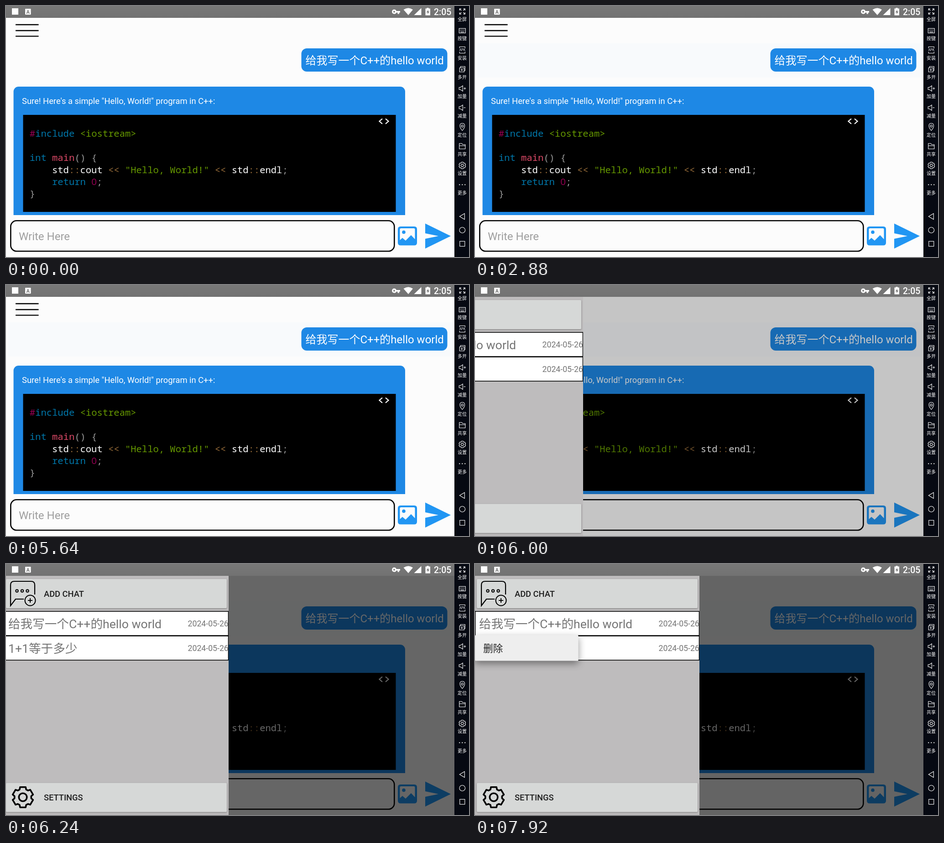
Write an HTML page that moves like this. It is 1015 px wide and 551 px high and loops after 8000 ms.

```html
<!DOCTYPE html>
<html lang="zh-CN">
<head>
<meta charset="utf-8">
<title>Chat app demo</title>
<style>
html, body { margin: 0; width: 100%; height: 100%; overflow: hidden; background: #fcfcfc; }
svg { display: block; width: 1015px; height: 551px; }
text { font-family: Roboto, "Noto Sans CJK SC", "Noto Sans CJK", sans-serif; white-space: pre; }
.line { fill: none; stroke: #000; }
.code text { font: 20.5px "Noto Sans Mono", "DejaVu Sans Mono", monospace; fill: #fff; }
.code .kw { fill: #07a; }
.code .num { fill: #905; }
.code .str { fill: #690; }
.code .fn { fill: #dd4a68; }
.code .op { fill: #9a6e3a; }
.code .pt { fill: #999; }
.code .zero { font-family: "Open Sans", sans-serif; }
.btn { fill: #d6d8d7; filter: drop-shadow(0 1.5px 1.5px rgba(0,0,0,.38)); }
.caps { font-size: 18.3px; font-weight: 500; fill: #1f1f1f; }
.item { font-size: 26.6px; fill: #757575; }
.date { font-size: 17.7px; fill: #757575; }
.pop { filter: drop-shadow(0 6px 8px rgba(0,0,0,.42)); }
.side text { font: 10px "Noto Sans CJK SC", "Noto Sans CJK", sans-serif; fill: #fff; text-anchor: middle; }
.side g { fill: none; stroke: #fff; stroke-width: 1.1; }
</style>
</head>
<body>
<svg viewBox="0 0 1015 551">
  <defs>
    <clipPath id="listClip"><rect y="82" width="983" height="377"/></clipPath>
    <clipPath id="appClip"><rect width="983" height="551"/></clipPath>
    <clipPath id="panelClip"><rect y="26" width="492" height="525"/></clipPath>
    <linearGradient id="bar" x2="0" y2="1">
      <stop offset="0" stop-color="#787878"/><stop offset="1" stop-color="#727272"/>
    </linearGradient>
  </defs>

  <g clip-path="url(#appClip)">
    <rect width="983" height="551" fill="#fcfcfc"/>
    <path class="line" stroke-width="2.4" d="M21 41H71.5M21 54H71.5M21 66.4H71.5"/>

    <g clip-path="url(#listClip)">
      <rect id="tint" x="5" y="82" width="975" height="75" fill="#f8fafc"/>
      <rect x="647.5" y="93" width="320" height="51" rx="12" fill="#1e88e5"/>
      <text x="656.5" y="128.300" font-size="24" fill="#fff">给我写一个C++的hello world</text>

      <rect x="16.5" y="177" width="858.5" height="310" rx="11" fill="#1e88e5"/>
      <text x="35" y="215" font-size="18.35" fill="#fff">Sure! Here's a simple "Hello, World!" program in C++:</text>
      <rect x="37.5" y="239" width="817" height="213"/>
      <path d="M825 247.5L818.5 253L825 258.8M832 247.5L838.5 253L832 258.8" fill="none" stroke="#fff" stroke-width="2.2"/>
      <g class="code" id="code"></g>
      <rect id="press" x="5" y="165" width="975" height="294"/>
    </g>

    <rect x="10.3" y="471.3" width="841" height="67" rx="13" class="line" stroke-width="2.6"/>
    <text x="28" y="514" font-size="24" fill="#9e9e9e">Write Here</text>
    <g fill="#2196f3">
      <path fill-rule="evenodd" d="M865 484H895Q901 484 901 490V519.500Q901 525.500 895 525.500H865Q859 525.500 859 519.500V490Q859 484 865 484ZM866 488Q863.500 488 863.500 490.500V514L869 509L876 515L888 503L896.500 512V490.500Q896.500 488 894 488Z"/>
      <circle cx="872" cy="496.500" r="3.800"/>
      <path d="M919 477.500L975 505L919 532.500V511L948 505L919 499Z"/>
    </g>

    <rect id="scrim" y="26" width="983" height="525"/>

    <g id="drawer">
      <g clip-path="url(#panelClip)">
        <rect y="26" width="492" height="525" fill="#bebcbd"/>
        <rect class="btn" x="4" y="33" width="484" height="64" rx="2"/>
        <rect class="btn" x="4" y="480.500" width="484" height="64" rx="2"/>
        <path class="line" stroke-width="2.2" d="M67 67V46Q67 38 59 38H22Q14 38 14 46V91.500L25 77H43"/>
        <g class="line" stroke-width="2">
          <circle cx="28" cy="59" r="2.700"/><circle cx="39.500" cy="59" r="2.700"/><circle cx="51" cy="59" r="2.700"/>
          <circle cx="57" cy="80" r="11.500"/><path d="M57 75V85M52 80H62"/>
        </g>
        <text class="caps" x="87" y="72">ADD CHAT</text>
        <g id="gear" class="line" stroke-width="3.600" stroke-linejoin="round"></g>
        <text class="caps" x="87" y="519">SETTINGS</text>
        <g id="chats"></g>
        <rect id="rowPress" x="1" y="104" width="490" height="52"/>
      </g>
    </g>

    <g id="popup">
      <rect class="pop" id="card" y="-1" width="226.500" height="56.500" rx="1.500"/>
      <text x="18" y="36" font-size="21.600" fill="#212121">删除</text>
    </g>

    <rect width="983" height="26" fill="url(#bar)"/>
    <g fill="#fff">
      <rect x="13" y="5" width="14" height="14"/>
      <rect x="42" y="6" width="12.500" height="13" rx="1"/>
      <path fill-rule="evenodd" d="M851 7.500A5 5 0 1 0 855.800 14.500H858.500V17.500H862V14.500H864V11H855.800A5 5 0 0 0 851 7.500ZM851 10.800A1.800 1.800 0 1 1 850.900 10.800Z"/>
      <path d="M871.500 8Q882 1 892 8L882 20ZM910.500 4.500V20H894.500Z"/>
      <path d="M922.500 4H926.500V5.500H930V20.500H919.500V5.500H922.500Z"/>
      <text x="938" y="19.500" font-size="19.400" font-weight="500">2:05</text>
    </g>
    <path d="M926 8L921.800 14H924.400V18L928 12H925.500Z" fill="#757575"/>
    <text x="48.200" y="16.500" font-size="11" font-weight="700" fill="#757575" text-anchor="middle">A</text>
  </g>

  <g class="side" id="side">
    <rect x="983" width="32" height="551" fill="#060912"/>
  </g>
</svg>
<script>
const $ = id => document.getElementById(id);
const set = (id, attrs) => {
  for (const name in attrs) $(id).setAttribute(name, attrs[name]);
};

const gear = (x, y, r) => {
  const teeth = 6, pts = [];
  for (let i = 0; i < teeth * 4; i++) {
    const side = [-.4, -.27, .27, .4][i % 4];
    const size = Math.abs(side) < .3 ? r : r * .8;
    const a = Math.floor(i / 4) * 2 * Math.PI / teeth - Math.PI / 2 + side;
    pts.push((x + size * Math.cos(a)).toFixed(1) + "," + (y + size * Math.sin(a)).toFixed(1));
  }
  return `<polygon points="${pts.join(" ")}"/><circle cx="${x}" cy="${y}" r="${r * .38}"/>`;
};
$("gear").innerHTML = gear(41, 512, 23);

$("chats").innerHTML = ["给我写一个C++的hello world", "1+1等于多少"].map((title, i) =>
  `<g transform="translate(0 ${i * 54})">
    <rect x=".5" y="104" width="491" height="53" fill="#fff" stroke="#000" stroke-width="1.6"/>
    <text class="item" x="9" y="141">${title}</text>
    <text class="date" x="402.5" y="137.300">2024-05-26</text>
  </g>`).join("");

// Code listing, one string per line, each token as class|text
const listing = [
  ["num|#", "kw|include", "| ", "str|<iostream>"],
  [],
  ["kw|int", "| ", "fn|main", "pt|()", "| ", "pt|{"],
  ["|    std", "op|::", "|cout ", "op|<<", "| ", 'str|"Hello, World!"', "| ", "op|<<", "| std", "op|::", "|endl", "pt|;"],
  ["|    ", "kw|return", "| ", "num zero|0", "pt|;"],
  ["pt|}"]
];
const escape = s => s.replace(/</g, "&lt;").replace(/>/g, "&gt;");
$("code").innerHTML = listing.map((tokens, row) =>
  `<text x="51.8" y="${287.3 + row * 26.4}" xml:space="preserve">` + tokens.map(token => {
    const [cls, word] = token.split("|");
    return `<tspan class="${cls}">${escape(word)}</tspan>`;
  }).join("") + "</text>").join("");

// Side tools, drawn around their own centre
const speaker = '<path d="M-7-2.500H-4L1-6V6L-4 2.500H-7Z"/>';
const tools = [
  ["全屏", '<path d="M-6-2V-6H-2M2-6H6V-2M6 2V6H2M-2 6H-6V2M-6-6L-2-2M6-6L2-2M6 6L2 2M-6 6L-2 2"/>'],
  ["按键", '<rect x="-7" y="-5" width="14" height="10"/><path d="M-5-2H5M-5 .500H5" stroke-dasharray="1.500 1.500"/><path d="M-4 3H4"/>'],
  ["安装", '<path d="M-6-4V-7H6V-4M-6 4V7H6V4"/><text y="2.800" stroke="none" style="font-size:7px">APK</text>'],
  ["多开", '<path d="M-4-3V-6H6V3H4M-6-3H4V6H-6ZM-1-1V4M-3.500 1.500H1.500"/>'],
  ["加量", speaker + '<path d="M3 0H8M5.500-2.500V2.500"/>'],
  ["减量", speaker + '<path d="M3 0H7"/>'],
  ["定位", '<path d="M0 8C-8-1-6-8 0-8S8-1 0 8Z"/><circle cy="-2" r="2.300"/>'],
  ["共享", '<path d="M-6.500 6V-6H-1L1-3.500H6.500V6ZM-6.500-1H6.500"/>'],
  ["设置", gear(0, 0, 7.5)],
  ["更多", '<path d="M-7 0H8" stroke-width="2" stroke-dasharray="2 4"/>']
];
const keys = [
  '<path d="M5-6.500V6.500L-6 0Z"/>',
  '<circle r="6.300"/>',
  '<rect x="-5.500" y="-5.500" width="11" height="11"/>'
];
const place = (y, art) => `<g transform="translate(1000.300 ${y})">${art}</g>`;
$("side").innerHTML += tools.map(([label, art], i) =>
  place(12 + i * 42.25, art) + `<text x="1000" y="${33 + i * 42.3}">${label}</text>`).join("")
  + keys.map((art, i) => place(462 + i * 30, art)).join("");

const LOOP = 8000, FRAME = 120, PANEL = 492, PANEL_OPEN = 6000;
const clamp = v => Math.min(1, Math.max(0, v));

// Each menu slides from the touch point to x, y after a long press
const menus = [
  { press: 1800, show: 2160, hide: 2760, x: 0, y: 110, drop: 18, span: 240 },
  { press: 3240, show: 3600, hide: 5520, x: 5, y: 110, drop: 18, span: 240 },
  { press: 7080, show: 7080, hide: LOOP, x: 0, y: 157, drop: 0, span: 120 }
];

function drawMenu(t, inDrawer) {
  const m = menus.findLast(menu => menu.press <= t) || menus[0];
  const left = (1 - clamp((t - m.show) / m.span)) ** 3;
  const hold = clamp((t - m.press + FRAME) / (m.show - m.press + FRAME));
  const shade = .07 * hold * left * (t >= m.press);
  const fade = t < m.hide ? 1 : t < m.hide + FRAME ? .4 : 0;

  set("popup", {
    transform: `translate(${m.x + 30 * left} ${m.y + m.drop * left})`,
    opacity: t < m.show ? 0 : fade * (1 - .03 * left)
  });
  set("card", { fill: inDrawer ? "#eee" : "#fafafa" });
  set("press", { opacity: inDrawer ? 0 : shade });
  set("rowPress", { opacity: inDrawer ? shade : 0 });
  set("tint", { opacity: t < menus[0].press ? 0 : 1 });
}

function drawDrawer(t, open) {
  // Quintic ease-out, already under way when the panel first appears
  const p = clamp(.123 + (t - PANEL_OPEN) / 485);
  const shown = open ? 1 - (1 - p) ** 5 : 0;
  set("drawer", {
    transform: `translate(${Math.round(PANEL * (shown - 1))} 0)`,
    visibility: open ? "visible" : "hidden"
  });
  set("scrim", { opacity: .6 * shown ** 1.37 });
}

const start = performance.now();
function tick() {
  const now = (performance.now() - start) % LOOP;
  const t = Math.floor(now / FRAME) * FRAME;
  const open = t >= PANEL_OPEN;
  drawMenu(t, open);
  drawDrawer(t, open);
  requestAnimationFrame(tick);
}
tick();
</script>
</body>
</html>
```
